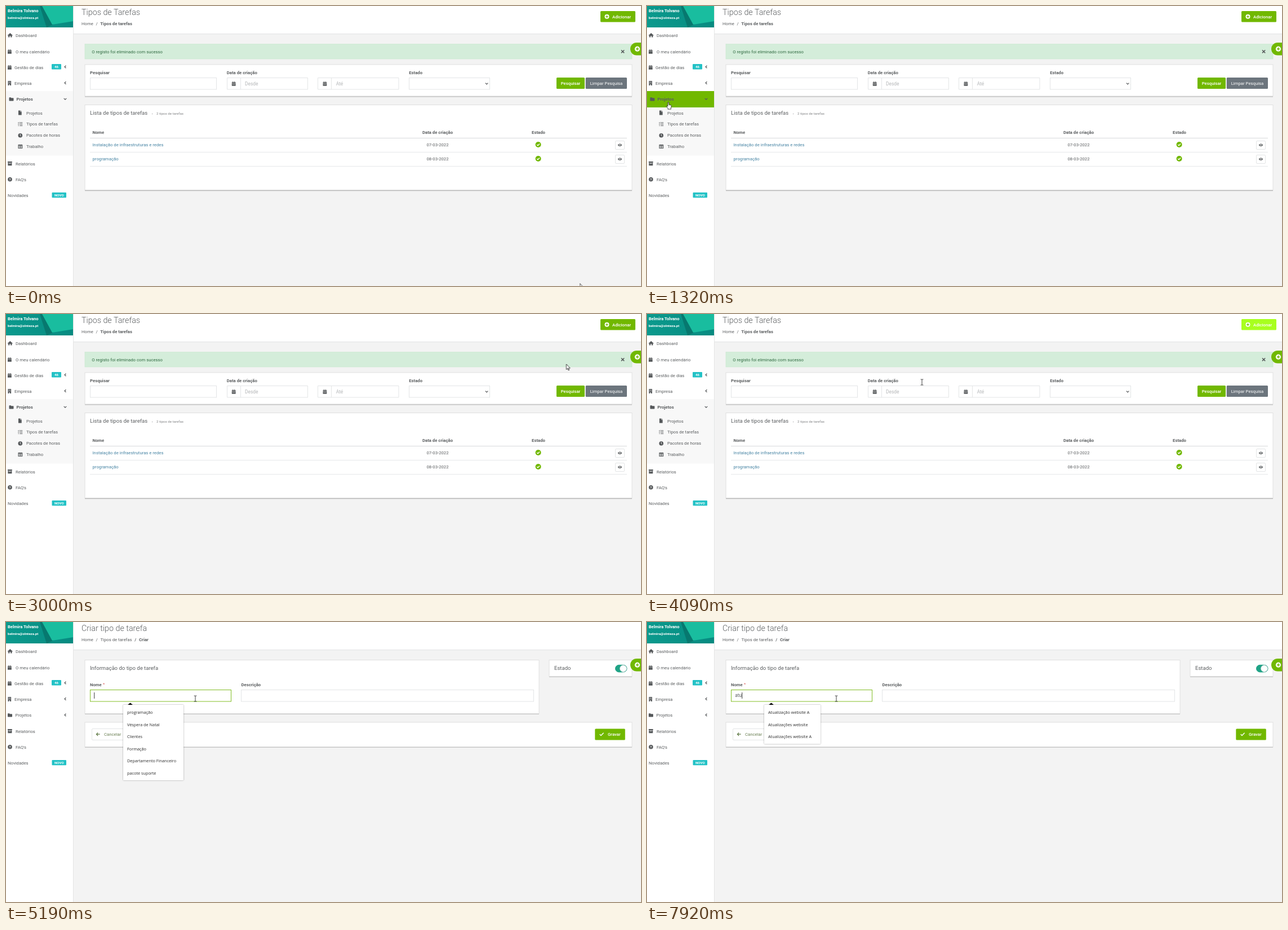
An HTML page that plays this animation: 1127x497 px, repeating every 8 s.

```html
<!DOCTYPE html>
<html lang="pt">
<head>
<meta charset="utf-8">
<title>Tipos de Tarefas</title>
<style>
html, body { margin: 0; width: 100%; height: 100%; overflow: hidden; background: #f3f3f3; }
svg { display: block; }
text { font: 7.76px Roboto, sans-serif; fill: #5c5f61; white-space: pre; }
.title { font-size: 14.3px; font-weight: 300; }
.head { font-size: 9.55px; }
.small { font-size: 6.2px; fill: #808284; }
.b { font-weight: 700; }
.m { text-anchor: middle; }
.w { fill: #fff; }
.act { fill: #fff; font-weight: 500; }
.link { fill: #4583a3; }
.hint { font-size: 8.4px; fill: #b4b6b8; }
.tag { font-size: 6.1px; font-weight: 700; fill: #fff; text-anchor: middle; }
.icon { fill: #55585a; }
.line { fill: none; stroke: #55585a; stroke-width: 1.2; }
.wline { fill: none; stroke: #fff; stroke-width: 1.4; }
.card { fill: #fff; stroke: #e0e0e0; }
.shade { stroke: #b8b8b8; stroke-width: 1.5; }
.field { fill: #fff; stroke: #e3e5e6; }
.rule { stroke: #e5e7e9; }
.green { fill: #71b800; }
.teal { fill: #23c2c6; }

/* one loop is 8 s, so 1% is 80 ms */
.list, .form, .slide, .hover, .cursor, .cursor > *, .drop, .caret, .typed tspan {
  animation: 8s step-end infinite;
}
.list { animation-name: list; }
.form { animation-name: form; }
.slide { animation-name: slide; }
@keyframes list { 0% { opacity: 1 } 52.2% { opacity: 0 } }
@keyframes form { 0% { opacity: 0 } 52.2% { opacity: 1 } }
@keyframes slide { 0% { transform: none } 52.2% { transform: translateY(-86px) } }

.hover { fill: #71b800; opacity: 0; }
.parent { animation-name: parent; }
.projects { animation-name: projects; }
.types { animation-name: types; }
@keyframes parent { 0% { opacity: 0 } 8.5% { opacity: 1 } 17.4% { opacity: 0 } }
@keyframes projects { 0% { opacity: 0 } 6.5% { opacity: 1 } 8.5% { opacity: 0 } 17.4% { opacity: 1 } 18.4% { opacity: 0 } }
@keyframes types { 0% { opacity: 0 } 18.4% { opacity: 1 } 29.8% { opacity: 0 } }

.add { animation: add 8s linear infinite; }
@keyframes add {
  0%, 38% { fill: #71b800 }
  40.4%, 43.2% { fill: #a8ff1f }
  43.6%, 44.2% { fill: #8fdc0e }
  45.4%, 100% { fill: #a8ff1f }
}

.cursor { animation-name: move; }
@keyframes move {
  0% { transform: translate(1018.5px, 492.5px); animation-timing-function: steps(3) }
  2.8% { transform: translate(800px, 420px); animation-timing-function: steps(3) }
  5.6% { transform: translate(180px, 250px); animation-timing-function: steps(2) }
  7.4% { transform: translate(22.5px, 182px); animation-timing-function: steps(3) }
  10.4% { transform: translate(40px, 163px) }
  15.5% { transform: translate(40px, 163px); animation-timing-function: steps(5) }
  20.2% { transform: translate(29px, 204px) }
  21% { transform: translate(29px, 204px); animation-timing-function: steps(2) }
  23% { transform: translate(58px, 206px); animation-timing-function: steps(2) }
  24.8% { transform: translate(39.5px, 207.5px) }
  29% { transform: translate(39.5px, 207.5px); animation-timing-function: steps(3) }
  31.6% { transform: translate(903px, 162px) }
  32.8% { transform: translate(903px, 162px); animation-timing-function: steps(8) }
  40.4% { transform: translate(1086px, 16px) }
  48.3% { transform: translate(1086px, 16px); animation-timing-function: steps(3) }
  51% { transform: translate(488px, 121px) }
  52.2% { transform: translate(450px, 135px) }
  53% { transform: translate(428px, 142px) }
  54.1% { transform: translate(428px, 142px); animation-timing-function: steps(2) }
  56% { transform: translate(421px, 144.5px); animation-timing-function: steps(9) }
  64.8%, 100% { transform: translate(336px, 136px) }
}
.cursor > .arrow { animation-name: arrow; }
.cursor > .hand { animation-name: hand; }
.cursor > .beam { animation-name: beam; }
@keyframes arrow {
  0% { opacity: 1 } 6.5% { opacity: 0 } 29.8% { opacity: 1 } 38.4% { opacity: 0 }
  49.2% { opacity: 1 } 51% { opacity: 0 } 52.2% { opacity: 1 } 58.9% { opacity: 0 }
}
@keyframes hand { 0% { opacity: 0 } 6.5% { opacity: 1 } 29.8% { opacity: 0 } 38.4% { opacity: 1 } 49.2% { opacity: 0 } }
@keyframes beam { 0% { opacity: 0 } 51% { opacity: 1 } 52.2% { opacity: 0 } 58.9% { opacity: 1 } }

.track { animation: track 8s linear infinite; }
.thumb { fill: #fff; stroke: #d4d6d7; stroke-width: .8; animation: thumb 8s linear infinite; }
@keyframes track {
  0%, 56.2% { fill: #fff; stroke: #e2e4e5 }
  61.5%, 100% { fill: #1fa386; stroke: #1fa386 }
}
@keyframes thumb { 0%, 54.9% { transform: translateX(-8px) } 56%, 100% { transform: none } }

.focus { animation: focus 8s linear infinite; }
@keyframes focus { 0%, 60.5% { stroke: #e3e5e6 } 62.5%, 100% { stroke: #82be25 } }
.caret { fill: #222; animation-name: caret; }
@keyframes caret {
  0% { opacity: 0; transform: none }
  61% { opacity: 1; transform: none }
  68.7% { opacity: 0; transform: none }
  76% { opacity: 1; transform: none }
  79.4% { opacity: 1; transform: translateX(4.7px) }
  86.3% { opacity: 0; transform: translateX(4.7px) }
  93.2% { opacity: 1; transform: translateX(4.7px) }
  95% { opacity: 1; transform: translateX(7.4px) }
  98.9% { opacity: 1; transform: translateX(12px) }
}
.typed { font-size: 8.4px; }
.typed .key1 { animation-name: key1; }
.typed .key2 { animation-name: key2; }
.typed .key3 { animation-name: key3; }
@keyframes key1 { 0% { fill-opacity: 0 } 79.4% { fill-opacity: 1 } }
@keyframes key2 { 0% { fill-opacity: 0 } 95% { fill-opacity: 1 } }
@keyframes key3 { 0% { fill-opacity: 0 } 98.9% { fill-opacity: 1 } }

.drop rect { fill: #fff; filter: drop-shadow(0 .8px 1.2px rgba(0, 0, 0, .4)); }
.drop path { fill: #fff; stroke: #e2e2e2; stroke-width: .6; }
.drop text { font: 7.3px "Open Sans", "Noto Sans", sans-serif; fill: #2c2c2c; }
.all { animation-name: all; }
.some { animation-name: some; }
.few { animation-name: few; }
@keyframes all { 0% { opacity: 0 } 63.8% { opacity: 1 } 79.4% { opacity: 0 } }
@keyframes some { 0% { opacity: 0 } 79.4% { opacity: 1 } 95% { opacity: 0 } }
@keyframes few { 0% { opacity: 0 } 95% { opacity: 1 } }
</style>
</head>
<body>
<svg width="1127" height="497" viewBox="0 0 1127 497">
  <defs>
    <linearGradient id="sea"><stop stop-color="#0b9a8d"/><stop offset="1" stop-color="#078a80"/></linearGradient>
    <path id="cal" d="M0 1.2h6.8v1.5H0zM0 3.3h6.8v4.4H0zM1.4 0h1.1v1.4H1.4zM4.3 0h1.1v1.4H4.3z"/>
    <path id="chev" d="M1.4-2.3-1 0 1.4 2.3"/>
    <path id="folder" d="M0 .8Q0 0 .8 0H3l1 1h3.2q.8 0 .8.8v3.7q0 .8-.8.8H.8Q0 6.3 0 5.5z"/>
    <g id="plus"><circle r="4" fill="#fff"/><path d="M-2.3 0h4.6M0-2.3v4.6" stroke="#71b800" stroke-width="1.3"/></g>
    <g id="done"><circle r="5" class="green"/><path class="wline" d="M-2.4.1-.7 1.8 2.5-1.5"/></g>
    <g id="view">
      <rect x="-8" y="-7.2" width="16" height="15" rx="1.5" class="field"/>
      <path class="icon" d="M-3.8 0Q0-5 3.8 0 0 5-3.8 0z"/><circle r="1.7" fill="#fff"/><circle r="1" class="icon"/>
    </g>
    <path id="notch" d="m216 147 4.5-3.5 4.5 3.5"/>
  </defs>

  <rect width="1127" height="497" fill="#f3f3f3"/>
  <rect x="119" width="1008" height="49" fill="#fff"/>
  <path d="M119 49.5h1008" stroke="#e1e2e3"/>

  <!-- sidebar -->
  <rect width="119" height="497" fill="#fff"/>
  <path d="M119.5 0v497" stroke="#e4e5e5"/>
  <rect width="119" height="38" fill="url(#sea)"/>
  <path d="M60 0h8l16 33-12 5z" fill="#07786f"/>
  <path d="M64 0h55v27l-37 6z" fill="#19bd9f"/>
  <text x="3" y="10.8" class="b w" style="font-size:7.6px">Belmira Tolvano</text>
  <text x="3" y="22.8" class="b w" style="font-size:6.2px">belmira@olnteza.pt</text>

  <path class="icon" d="M2.8 52 7.3 48l4.5 4-.6.7-.7-.5v3.4H8.2V53H6.4v2.6H4.1v-3.4l-.7.5z"/>
  <text x="17" y="54.8">Dashboard</text>
  <use href="#cal" x="3" y="77" class="icon"/>
  <text x="17" y="83.5">O meu calendário</text>
  <use href="#cal" x="3" y="105" class="icon"/>
  <text x="15" y="111.6">Gestão de dias</text>
  <rect x="81" y="103" width="17" height="9.6" rx="1" class="teal"/>
  <text x="89.5" y="110" class="tag">46</text>
  <use href="#chev" x="105" y="108" class="line"/>
  <path class="icon" fill-rule="evenodd" d="M3.5 133h5.6v8H3.5zM4.8 134.3v1h1v-1zm2 0v1h1v-1zm-2 2v1h1v-1zm2 0v1h1v-1zM5.6 139v2H7v-2z"/>
  <text x="15" y="140">Empresa</text>
  <use href="#chev" x="105" y="136.5" class="line"/>

  <g class="list">
    <rect y="151" width="119" height="114.5" fill="#f8f8f8"/>
    <rect class="hover parent" y="151" width="119" height="29"/>
    <rect class="hover projects" y="180" width="119" height="19.5"/>
    <rect class="hover types" y="199.5" width="119" height="20.5"/>
    <use href="#folder" x="5.5" y="162.2" class="icon"/>
    <text x="18.5" y="168" class="b">Projetos</text>
    <path class="line" d="m102.7 163.8 2.3 2.3 2.3-2.3"/>
    <path class="icon" d="M22 185.5h3.3v2.3h2.4v5.7H22zM25.9 185.5l1.8 1.7h-1.8z"/>
    <text x="36" y="192.6">Projetos</text>
    <path class="line" style="stroke-width:1" d="M24.3 207h5M24.3 209.7h5M24.3 212.4h5M21.3 207l.8.7 1.3-1.5M21.3 209.7l.8.7 1.3-1.5M21.6 212.4h1.3"/>
    <text x="36" y="212.3">Tipos de tarefas</text>
    <circle cx="25.3" cy="229.7" r="3.8" class="icon"/><path class="wline" style="stroke-width:.9" d="M25.3 227.3v2.6l1.5 1"/>
    <text x="36" y="232.3">Pacotes de horas</text>
    <path class="icon" fill-rule="evenodd" d="M21.5 246h7.7v7h-7.7zM22.5 248v1.5h2.3V248zm3.3 0v1.5h2.3V248zm-3.3 2.5v1.5h2.3v-1.5zm3.3 0v1.5h2.3v-1.5z"/>
    <text x="36" y="252.2">Trabalho</text>
  </g>
  <g class="form">
    <use href="#folder" x="3" y="162.2" class="icon"/>
    <text x="16.5" y="168">Projetos</text>
    <use href="#chev" x="105" y="165" class="line"/>
  </g>
  <g class="slide">
    <path class="icon" d="M3 276h7.8v1.9H3zM3.4 278.4h7v4.8h-7z"/>
    <path d="M5.5 279.6h2.8" stroke="#fff" stroke-width=".8"/>
    <text x="17" y="282.6">Relatórios</text>
    <circle cx="7" cy="307.7" r="3.8" class="icon"/>
    <text x="7" y="309.9" class="tag">?</text>
    <text x="17" y="310.6">FAQ's</text>
    <text x="3" y="339.3">Novidades</text>
    <rect x="81.5" y="331" width="25.5" height="9.3" rx="1" class="teal"/>
    <text x="94.3" y="337.8" class="tag">NOVO</text>
  </g>

  <!-- task type list -->
  <g class="list">
    <text x="134" y="16" class="title">Tipos de Tarefas</text>
    <text x="134" y="34">Home</text><text x="159.5" y="34">/</text>
    <text x="167.3" y="34" class="b">Tipos de tarefas</text>
    <rect x="1055" y="9" width="62" height="19.5" rx="1.5" class="add"/>
    <use href="#plus" x="1066.5" y="18.8"/>
    <text x="1076" y="21.6" class="act">Adicionar</text>

    <rect x="140" y="67.5" width="971" height="26.5" fill="#d4edda" stroke="#c6e6ce" stroke-width=".6"/>
    <text x="152.3" y="83.6" style="fill:#2f6a40">O registo foi eliminado com sucesso</text>
    <path class="line" style="stroke-width:1.5" d="m1092 78.2 5.2 5.2m0-5.2-5.2 5.2"/>

    <path class="shade" d="M140 160.7h971M140 327.4h971"/>
    <rect x="140" y="104" width="971" height="56" class="card"/>
    <text x="149" y="121" class="b">Pesquisar</text>
    <text x="391.8" y="121" class="b">Data de criação</text>
    <text x="715.2" y="121" class="b">Estado</text>
    <g class="field">
      <rect x="149.5" y="127.5" width="224" height="20.5"/>
      <path d="M392.5 127.5h143V148h-143zM416.5 127.5V148"/>
      <path d="M553.5 127.5h143.5V148H553.5zM577.5 127.5V148"/>
      <rect x="715.5" y="127.5" width="143" height="20.5"/>
    </g>
    <use href="#cal" x="400.8" y="134" class="icon"/>
    <use href="#cal" x="562.5" y="134" class="icon"/>
    <path d="M402 139.2h4.5M563.7 139.2h4.5" stroke="#fff" stroke-width=".9" stroke-dasharray="1 .7"/>
    <text x="424" y="140.9" class="hint">Desde</text>
    <text x="585.7" y="140.9" class="hint">Até</text>
    <path class="line" d="m850.8 136.6 2.3 2.3 2.3-2.3"/>
    <rect x="977" y="127" width="50" height="20" rx="1.5" class="green"/>
    <text x="1002" y="139.7" class="act m">Pesquisar</text>
    <rect x="1028.7" y="127" width="73.3" height="20" rx="1.5" fill="#6c757d"/>
    <text x="1065.5" y="139.7" class="w m">Limpar Pesquisa</text>

    <rect x="140" y="175.5" width="971" height="151" class="card"/>
    <text x="149" y="193" class="head">Lista de tipos de tarefas</text>
    <text x="258.5" y="193" class="small b">-</text>
    <text x="267" y="193" class="small">2 tipos de tarefas</text>
    <text x="153.5" y="226.7" class="b">Nome</text>
    <text x="766" y="226.7" class="b m">Data de criação</text>
    <text x="945" y="226.7" class="b m">Estado</text>
    <path d="M149 234.5h953" stroke="#d8dadb"/>
    <path d="M149 259.5h953M149 284.5h953" class="rule"/>
    <text x="153.5" y="249" class="link">Instalação de infraestruturas e redes</text>
    <text x="766" y="249" class="m">07-03-2022</text>
    <use href="#done" x="944.6" y="246"/><use href="#view" x="1089.5" y="246.7"/>
    <text x="153.5" y="274" class="link">programação</text>
    <text x="766" y="274" class="m">08-03-2022</text>
    <use href="#done" x="944.6" y="271"/><use href="#view" x="1089.5" y="271.7"/>
  </g>

  <!-- new task type -->
  <g class="form">
    <text x="134" y="16" class="title">Criar tipo de tarefa</text>
    <text x="134" y="34">Home</text><text x="159.5" y="34">/</text>
    <text x="167.5" y="34">Tipos de tarefas</text><text x="228.3" y="34" class="b">/</text>
    <text x="236" y="34" class="b">Criar</text>

    <path class="shade" d="M140 163h806M964 97h147M140 222h971"/>
    <rect x="140" y="67.5" width="806" height="95" class="card"/>
    <text x="149" y="85.2" class="head">Informação do tipo de tarefa</text>
    <text x="149" y="113.9" class="b">Nome</text>
    <text x="172.3" y="113.4" style="font-size:6.5px;fill:#d9534f">*</text>
    <text x="417.5" y="113.9" class="b">Descrição</text>
    <rect x="149.5" y="120.5" width="250" height="20.5" class="field focus"/>
    <rect x="417.5" y="120.5" width="519" height="20.5" class="field"/>
    <text x="156.3" y="133" class="typed"><tspan class="key1">a</tspan><tspan class="key2">t</tspan><tspan class="key3">u</tspan></text>
    <rect x="156.3" y="125" width=".9" height="11" class="caret"/>

    <rect x="964" y="67.5" width="147" height="29" class="card"/>
    <text x="973" y="85.2" class="head">Estado</text>
    <rect x="1081.5" y="76.3" width="20.5" height="12.6" rx="6.3" class="track"/>
    <circle cx="1095.5" cy="82.6" r="5.9" class="thumb"/>

    <rect x="140" y="178" width="971" height="43.5" class="card"/>
    <rect x="152.5" y="189.5" width="60" height="20" rx="1.5" class="field"/>
    <path class="line" style="stroke:#5f7a45" d="M166.6 199.2h-6M163.2 196.4l-2.8 2.8 2.8 2.8"/>
    <text x="174" y="202" style="fill:#6b8055">Cancelar</text>
    <rect x="1045.3" y="189.5" width="53.5" height="20" rx="1.5" class="green"/>
    <path class="wline" d="m1053.7 199.2 2.3 2.3 4.6-4.8"/>
    <text x="1068" y="202" class="act">Gravar</text>
  </g>

  <rect x="1108" y="65" width="34" height="22.5" rx="11.2" class="green"/>
  <use href="#plus" transform="translate(1120.5 76.2) scale(1.15)"/>

  <!-- suggestions -->
  <g class="drop all">
    <rect x="208" y="147" width="107" height="134" rx="1"/><use href="#notch"/>
    <text y="163.2"><tspan x="215">programação</tspan><tspan x="215" dy="21.5">Véspera de Natal</tspan><tspan x="215" dy="21.5">Clientes</tspan><tspan x="215" dy="21.5">Formação</tspan><tspan x="215" dy="21.5">Departamento Financeiro</tspan><tspan x="215" dy="21.5">pacote suporte</tspan></text>
  </g>
  <g class="drop some">
    <rect x="208" y="147" width="100" height="113" rx="1"/><use href="#notch"/>
    <text y="163.2"><tspan x="215">Atualização website A</tspan><tspan x="215" dy="21.5">Atualizações website</tspan><tspan x="215" dy="21.5">Atualizações website A</tspan><tspan x="215" dy="21.5">Apoio ao cliente</tspan><tspan x="215" dy="21.5">Ano Novo</tspan></text>
  </g>
  <g class="drop few">
    <rect x="208" y="147" width="100" height="69.5" rx="1"/><use href="#notch"/>
    <text y="163.2"><tspan x="215">Atualização website A</tspan><tspan x="215" dy="21.5">Atualizações website</tspan><tspan x="215" dy="21.5">Atualizações website A</tspan></text>
  </g>

  <g class="cursor" fill="#fff" stroke="#111" stroke-width=".8" stroke-linejoin="round">
    <path class="arrow" d="M0 0v9.6l2.2-2 1.5 3.4 1.5-.6-1.5-3.3h3z"/>
    <path class="hand" d="M-1 .6Q-1-.5 0-.5T1 .6V4l3.6.8q1 .4.9 1.6L4.6 10v2H-.6v-1.4L-3.3 7q-.3-1.2.9-1.1L-1 7z"/>
    <path class="beam" fill="none" d="M-2.3-5h1.5L0-4.5.8-5h1.5M0-4.5v9M-2.3 5h1.5L0 4.5.8 5h1.5"/>
  </g>
</svg>
</body>
</html>
```
